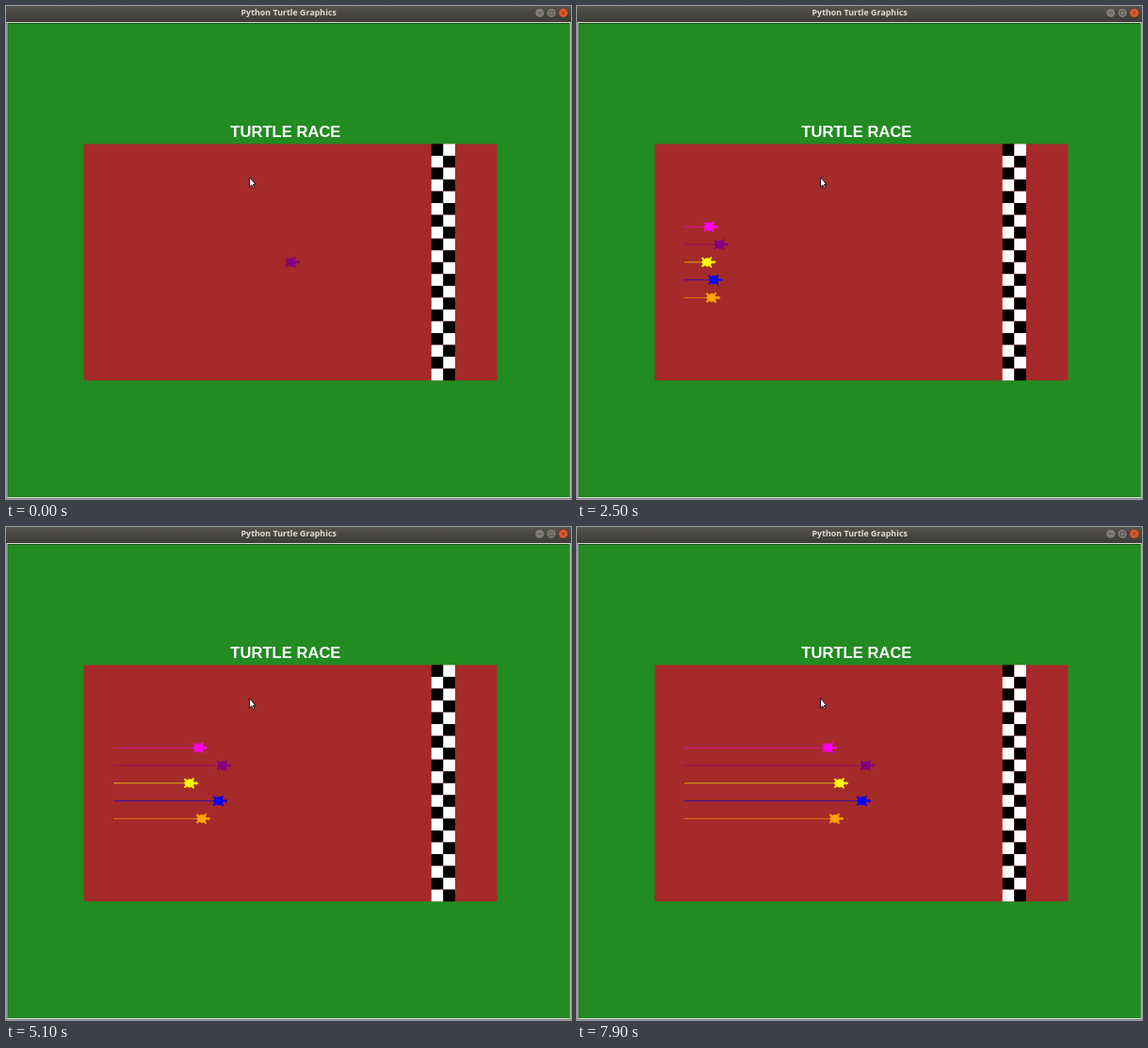
Recreate the animation shown at these times as an HTML page with a canvas. Size 600 px wide and 523 px high, loop 8 s.

```html
<!DOCTYPE html>
<html lang="en">
<head>
<meta charset="utf-8">
<title>Turtle race</title>
<style>
html, body { margin: 0; width: 100%; height: 100%; overflow: hidden; }
canvas { display: block; }
</style>
</head>
<body>
<canvas id="stage" width="600" height="523"></canvas>
<script>
const ctx = document.getElementById('stage').getContext('2d');
const LOOP = 8000, STEP = 100, SETUP = 280, PAUSE = 50;
const UNIT = 0.627, CX = 302, CY = 271.8, START = 114, LANE = 30 * UNIT;

// Turtles in order of setup: lane from the centre, distance run at each split time
const splits = [1400, 3200, 5100, 6000, 7100, 7900];
const turtles = [
  { color: 'purple', lane: -1, run: [0, 60, 115, 133, 167, 192] },
  { color: 'blue', lane: 1, run: [0, 50, 111, 132, 163, 188] },
  { color: 'orange', lane: 2, run: [0, 46, 93, 115, 138, 159] },
  { color: 'magenta', lane: -2, run: [0, 42, 90, 108, 140, 152] },
  { color: 'yellow', lane: 0, run: [0, 38, 80, 112, 138, 164] }
];

// One side of the body from nose to tail, mirrored for the other side
const side = [[16, 0], [14, 2], [10, 1], [7, 4], [9, 7], [8, 9], [5, 6], [1, 7],
  [-3, 5], [-6, 8], [-8, 6], [-5, 4], [-7, 0]];
const body = [...side, ...side.slice(1, -1).reverse().map(([x, y]) => [x, -y])];

const clamp = k => Math.min(1, Math.max(0, k));
const mix = (a, b, k) => a + (b - a) * k;

function rect(color, x, y, w, h) {
  ctx.fillStyle = color;
  ctx.fillRect(x, y, w, h);
}

function polygon(points) {
  ctx.beginPath();
  points.forEach(([x, y]) => ctx.lineTo(x, y));
  ctx.closePath();
}

function text(label, font, color, x, y) {
  ctx.font = font;
  ctx.fillStyle = color;
  ctx.textAlign = 'center';
  ctx.fillText(label, x, y);
}

function button(x, color, mark) {
  ctx.beginPath();
  ctx.arc(x, 7.3, 5, 0, Math.PI * 2);
  ctx.fillStyle = color;
  ctx.fill();
  ctx.strokeStyle = 'rgba(45, 44, 40, 0.7)';
  ctx.lineWidth = 0.7;
  ctx.stroke();
  ctx.stroke(new Path2D(mark));
}

function drawWindow() {
  const bar = ctx.createLinearGradient(0, 0, 0, 17);
  bar.addColorStop(0, '#55534d');
  bar.addColorStop(1, '#3c3b37');
  rect(bar, 0, 0, 600, 17);
  text('Python Turtle Graphics', 'bold 8.9px "Open Sans", sans-serif', '#dfdbd2', 300.2, 10.4);
  button(566.8, '#7f7d75', 'M564.5 7.3h4.6');
  button(579.2, '#7f7d75', 'M577.2 5.3h4v4h-4z');
  button(591.8, '#e2572b', 'M590 5.5l3.6 3.6m0-3.6l-3.6 3.6');

  rect('#777b75', 0, 17, 600, 506);
  rect('#d5d8d2', 0.6, 17, 599, 505.2);
  rect('#174617', 1.5, 18, 597, 503);
  rect('#228b22', 2.2, 18.8, 596.3, 502.2);
}

function drawTrack() {
  const top = CY - 200 * UNIT, cell = 20 * UNIT;
  text('TURTLE RACE', 'bold 16.6px "Liberation Sans", Arial, sans-serif', '#fff', 296.9, 139.4);
  rect('#a52a2a', CX - 350 * UNIT, top, 700 * UNIT, 400 * UNIT);
  for (let row = 0; row < 20; row++)
    for (let col = 0; col < 2; col++)
      rect((row + col) % 2 ? '#fff' : '#000', 451.8 + col * cell, top + row * cell, cell, cell);
}

function drawCursor() {
  polygon([[258.6, 181.6], [258.6, 192], [260.8, 189.9], [262.3, 193.3], [263.8, 192.6],
    [262.4, 189.4], [265, 189.2]]);
  ctx.fillStyle = '#fff';
  ctx.strokeStyle = '#111';
  ctx.lineWidth = 1;
  ctx.fill();
  ctx.stroke();
}

function distance(run, t) {
  const i = Math.max(1, splits.findIndex(split => t <= split));
  return mix(run[i - 1], run[i], clamp((t - splits[i - 1]) / (splits[i] - splits[i - 1])));
}

function drawTurtle({ color, lane, run }, index, t) {
  const age = t - index * SETUP;
  if (age < 0) return;
  const placed = clamp((age - PAUSE) / (SETUP - PAUSE));
  const x = mix(CX, START, placed) + distance(run, t);
  const y = CY + lane * LANE * placed;

  ctx.fillStyle = ctx.strokeStyle = color;
  ctx.lineWidth = UNIT;
  if (t > splits[0]) {
    ctx.beginPath();
    ctx.moveTo(START, y);
    ctx.lineTo(x, y);
    ctx.stroke();
  }
  polygon(body.map(([a, b]) => [x + a * UNIT, y + b * UNIT]));
  ctx.fill();
  ctx.stroke();
}

function frame(now) {
  const t = Math.floor(now % LOOP / STEP) * STEP;
  drawWindow();
  drawTrack();
  turtles.forEach((turtle, i) => drawTurtle(turtle, i, t));
  drawCursor();
  requestAnimationFrame(frame);
}
requestAnimationFrame(frame);
</script>
</body>
</html>
```
